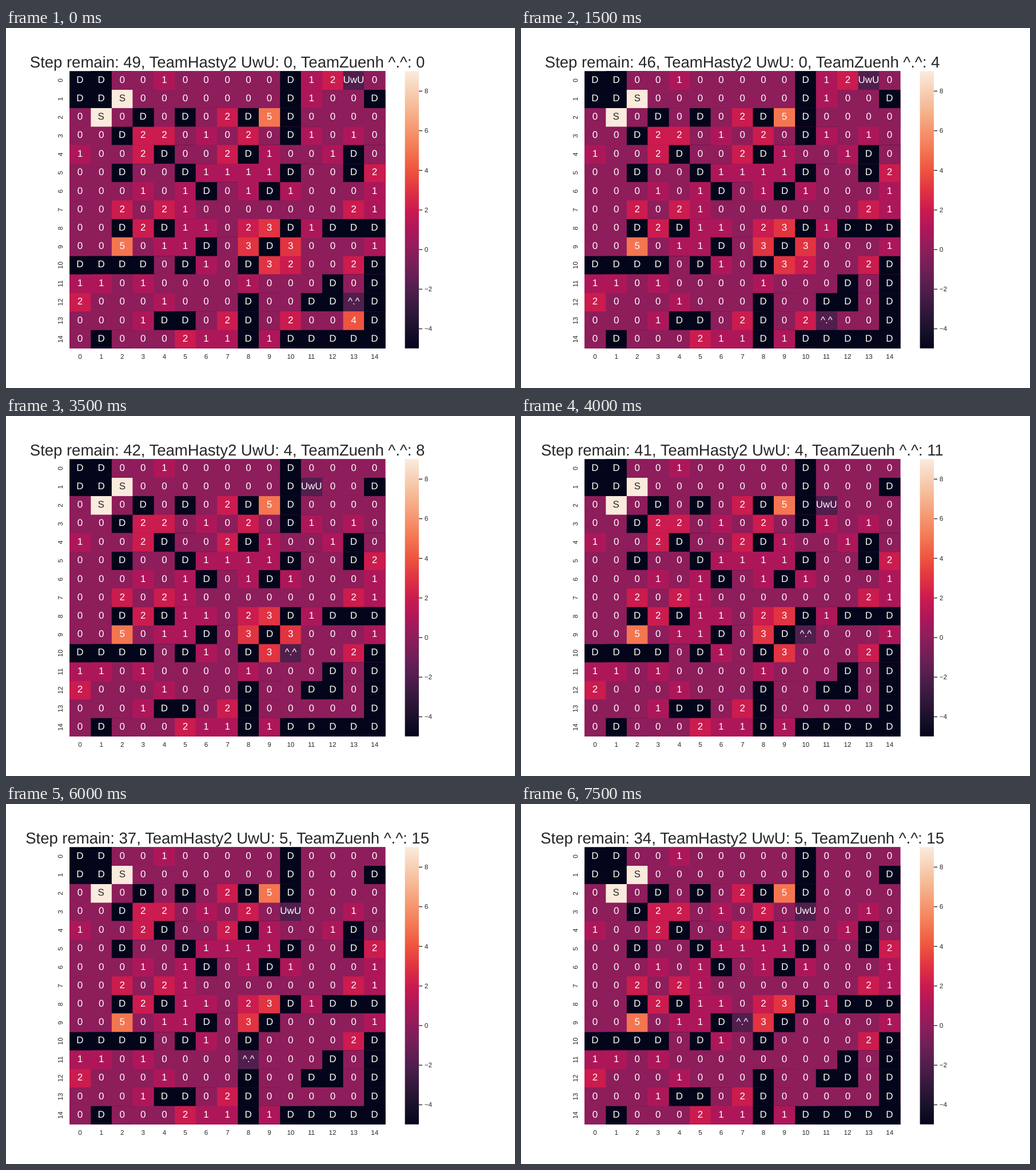
Write an HTML page that moves like this. It is 890 px wide and 629 px high and loops after 8000 ms.

```html
<!DOCTYPE html>
<html lang="en">
<head>
<meta charset="utf-8">
<title>Grid game</title>
<style>
  html, body { margin: 0; width: 100%; height: 100%; overflow: hidden; background: #fff; }
  svg { display: block; width: 890px; height: 629px; }
  text { font-family: "Liberation Sans", Arial, sans-serif; fill: #262626; text-rendering: geometricPrecision; }
  .title { font-size: 36.11px; }
  .cell { font-size: 22.22px; }
  .tick { font-size: 15.28px; }
</style>
</head>
<body>
<svg id="stage" viewBox="0 0 1170 827" preserveAspectRatio="none">
  <defs><linearGradient id="ramp" x1="0" y1="1" x2="0" y2="0"></linearGradient></defs>
</svg>
<script>
const SIZE = 15, STEP_MS = 500, LOOP_MS = 8000, LOW = -5, HIGH = 9;

// The chart is laid out on 1170 x 827 units and scaled down to the stage
const LEFT = 146.25, TOP = 99.24, WIDTH = 725.4, HEIGHT = 636.79;
const CW = WIDTH / SIZE, CH = HEIGHT / SIZE;
const BAR = { x: 917, right: 949, top: 99, bottom: 736 };

// Colours for the values -5 to 9
const COLORS = ['#03051a', '#1b112b', '#35193e', '#511e4d', '#701f57', '#8e1d5b', '#ad1759', '#cb1b4f',
  '#e13342', '#ee543f', '#f37651', '#f5956f', '#f6b48f', '#f7d0b5', '#faebdd'];

const BOARD = [
  'DD00100000D1200',
  'DDS0000000D100D',
  '0S0D0D02D5D0000',
  '00D2201020D1010',
  '1002D002D1001D0',
  '00D00D1111D00D2',
  '000101D01D10001',
  '002021000000021',
  '00D2D11023D1DDD',
  '005011D03D30001',
  'DDDD0D10D32002D',
  '110100001000D0D',
  '20001000D00DD0D',
  '0001DD02D02004D',
  '0D000211D1DDDDD'
];

const PLAYERS = [
  { team: 'TeamHasty2', face: 'UwU', row: 0, col: 13, moves: '....LLDDDL.....' },
  { team: 'TeamZuenh', face: '^.^', row: 12, col: 13, moves: 'DLLLUUUUDLDLLUU' }
];
const DIRS = { '.': [0, 0], L: [0, -1], R: [0, 1], U: [-1, 0], D: [1, 0] };

const svg = document.getElementById('stage');

function add(parent, tag, attrs, text = '') {
  const el = document.createElementNS('http://www.w3.org/2000/svg', tag);
  for (const key in attrs) el.setAttribute(key, attrs[key]);
  el.textContent = text;
  parent.appendChild(el);
  return el;
}

// Centre a label on x, with its start on a whole unit
function center(label, text, x) {
  label.textContent = text;
  label.setAttribute('x', Math.round(x - label.getComputedTextLength() / 2));
}

const edgeX = c => Math.round(LEFT + c * CW);
const edgeY = r => Math.round(TOP + r * CH);
const midX = c => LEFT + (c + 0.5) * CW;
const midY = r => TOP + (r + 0.5) * CH;

function valueOf(mark) {
  if (mark === 'D') return LOW;
  if (mark === 'S') return HIGH;
  return mark.length > 1 ? -2 : +mark;
}

// Play the whole game once and keep the board and title of each step
function play() {
  const grid = BOARD.map(row => [...row]);
  const pos = PLAYERS.map(p => [p.row, p.col]);
  const score = PLAYERS.map(() => 0);
  const steps = [];
  for (let s = 0; s < LOOP_MS / STEP_MS; s++) {
    if (s > 0) PLAYERS.forEach((p, i) => {
      const [dr, dc] = DIRS[p.moves[s - 1]];
      const r = pos[i][0] += dr, c = pos[i][1] += dc;
      score[i] += Math.max(0, valueOf(grid[r][c]));
      grid[r][c] = '0';
    });
    const marks = grid.map(row => row.slice());
    PLAYERS.forEach((p, i) => { marks[pos[i][0]][pos[i][1]] = p.face; });
    const teams = PLAYERS.map((p, i) => `${p.team} ${p.face}: ${score[i]}`);
    steps.push({ marks, title: `Step remain: ${49 - s}, ${teams.join(', ')}` });
  }
  return steps;
}

const title = add(svg, 'text', { class: 'title', y: 91 });

// Each cell reaches under its right and lower neighbours, so no seams show
const cells = BOARD.map((line, r) => [...line].map((_, c) => ({
  box: add(svg, 'rect', {
    x: edgeX(c), y: edgeY(r),
    width: edgeX(Math.min(c + 2, SIZE)) - edgeX(c),
    height: edgeY(Math.min(r + 2, SIZE)) - edgeY(r)
  })
})));

cells.forEach((line, r) => line.forEach(cell => {
  cell.label = add(svg, 'text', { class: 'cell', y: Math.round(midY(r) + 5.5) });
}));

for (let i = 0; i < SIZE; i++) {
  center(add(svg, 'text', { class: 'tick', y: 760 }), i, midX(i));
  add(svg, 'text', {
    class: 'tick', 'text-anchor': 'middle', transform: `translate(130 ${midY(i)}) rotate(-90)`
  }, i);
}

// Colour bar
const ramp = document.getElementById('ramp');
COLORS.forEach((color, i) => add(ramp, 'stop', { offset: i / (COLORS.length - 1), 'stop-color': color }));
add(svg, 'rect', {
  x: BAR.x, y: BAR.top, width: BAR.right - BAR.x, height: BAR.bottom - BAR.top, fill: 'url(#ramp)'
});
for (let v = -4; v <= 8; v += 2) {
  const y = TOP + HEIGHT * (HIGH - v) / (HIGH - LOW);
  add(svg, 'line', {
    x1: BAR.right, x2: BAR.right + 8, y1: Math.round(y), y2: Math.round(y),
    stroke: '#262626', 'stroke-width': 1.74
  });
  add(svg, 'text', { class: 'tick', x: BAR.right + 13, y: Math.round(y + 5.5) },
    String(v).replace('-', '\u2212'));
}

const steps = play();
let shown = -1;

function show(index) {
  if (index === shown) return;
  shown = index;
  const { marks, title: heading } = steps[index];
  center(title, heading, LEFT + WIDTH / 2);
  cells.forEach((line, r) => line.forEach(({ box, label }, c) => {
    const mark = marks[r][c];
    box.setAttribute('fill', COLORS[valueOf(mark) - LOW]);
    center(label, mark, midX(c));
    label.style.fill = mark === 'S' ? '#262626' : '#fff';
  }));
}

const start = performance.now();
function tick() {
  const t = Math.max(0, performance.now() - start) % LOOP_MS;
  show(Math.floor(t / STEP_MS));
  requestAnimationFrame(tick);
}
tick();
</script>
</body>
</html>
```
